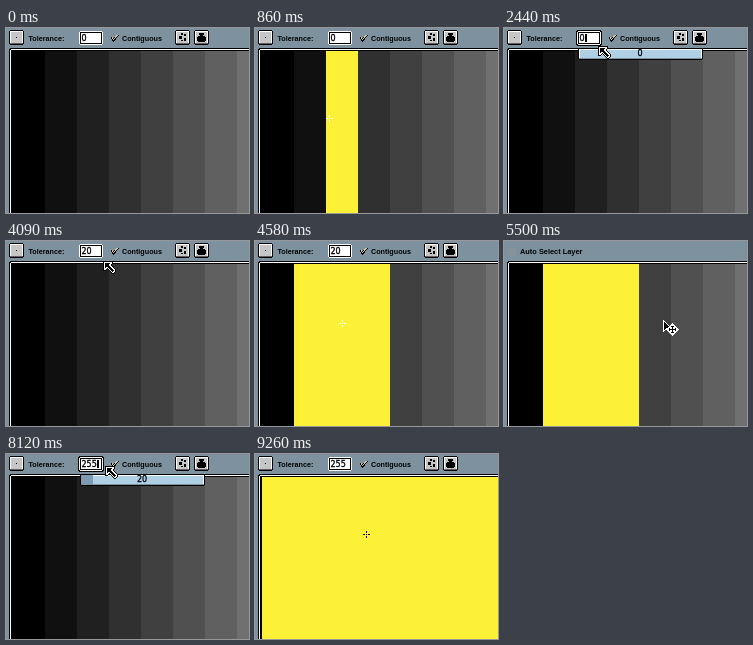
Recreate the animation shown at these times as an HTML page. Size 243x185 px, loop 9.3 s.

```html
<!DOCTYPE html>
<html lang="en">
<head>
<meta charset="utf-8">
<title>Fill tolerance</title>
<style>
  html, body { margin: 0; width: 100%; height: 100%; overflow: hidden; background: #7d929e; }
  svg { display: block; shape-rendering: crispEdges; }
  text { font: bold 7.2px "Liberation Sans", Arial, sans-serif; }
  .num { font: 8px "DejaVu Sans", sans-serif; stroke: #000; stroke-width: .3px; }
</style>
</head>
<body>
<svg width="243" height="185" viewBox="0 0 243 185">
  <defs>
    <g id="button">
      <path d="M1 0h13v1h1v13h-1v1h-13v-1h-1v-13h1z"/>
      <path fill="#fff" d="M1 1h13v12h-13z"/>
      <path fill="#c6c6c6" d="M2 2h11v11h-11z"/>
      <path fill="#655f65" d="M1 13h13v1h-13z"/>
    </g>
  </defs>
  <rect width="243" height="185" fill="#7d929e"/>
  <path d="M4 20H243V185H3V21H4z"/>
  <path fill="#fff" d="M5 21H243V22H5V185H4V22H5z"/>
  <g id="bands"></g>
  <rect id="fill" y="23" height="162" fill="#fcf137"/>

  <g id="tools">
    <use href="#button" x="3" y="2"/>
    <path d="M10 9h1v1h-1z"/>
    <text x="22.5" y="13">Tolerance:</text>
    <path id="focus" d="M73 2h24v1h1v14h-1v1h-24v-1h-1v-14h1z"/>
    <path fill="#fff" d="M74 3h22v1h1v12h-1v1h-22v-1h-1v-12h1z"/>
    <path d="M74 4h22v12h-22z"/>
    <path fill="#fff" d="M75 5h20v10h-20z"/>
    <text id="value" class="num" x="75.5" y="13"></text>
    <path id="caret" d="M0 6h2v8h-2z"/>
    <path fill="none" stroke="#000" stroke-width="2.400" d="M105.5 9.500l2 2.500l4.500-5"/>
    <path fill="none" stroke="#d8c5a5" d="M106 9.500l1.500 2l4-4.500"/>
    <text x="116" y="13">Contiguous</text>
    <use href="#button" x="169" y="2"/>
    <path d="M175 5h2v2h-2zM178 6h2v2h-2zM173 8h3v3h-3zM178 10h2v3h-2zM175 12h2v1h-2z"/>
    <use href="#button" x="188" y="2"/>
    <path d="M193 5h5v2h-1v1h2v1h1v4h-1v1h-7v-1h-1v-4h1v-1h2v-1h-1z"/>
  </g>

  <g id="layerBar">
    <rect x="5.5" y="7.5" width="6" height="6" rx="2" fill="#84939a" stroke="#909394"/>
    <text x="16" y="13" style="font-size:7.4px">Auto Select Layer</text>
  </g>

  <g id="popup">
    <path d="M75 20h123v1h1v10h-1v1h-123v-1h-1v-10h1z"/>
    <path fill="#fff" d="M75 21h123v9h-123z"/>
    <path fill="#afcfe4" d="M76 22h121v8h-121z"/>
    <path fill="#7d929e" d="M75 30h123v1h-123z"/>
    <rect id="level" x="75" y="21" height="9" fill="#7d9cb4"/>
    <text id="levelText" class="num" x="136" y="28" text-anchor="middle"></text>
  </g>

  <g id="cursor">
    <g id="arrow">
      <path d="M0 0H10V2L8 4L13 9V10L10 13H9L4 8L2 10H0z"/>
      <path fill="#fff" d="M1 1H9V2L7 4L12 9V10L10 12H9L4 7L2 9H1z"/>
      <path d="M2 2H7L5.500 4L11 9.500L9.500 11L4 5.500L2 7z"/>
    </g>
    <g id="move">
      <path stroke="#fff" d="M.5 .5V11.500L3.500 8.500L8.500 8.500z"/>
      <path fill="#fff" d="M9.500 3L16 9.500L9.500 16L3 9.500z"/>
      <path d="M9 6h1v3h3v1h-3v3h-1v-3h-3v-1h3zM8 6h3v1h-3zM8 12h3v1h-3zM6 8h1v3h-1zM12 8h1v3h-1z"/>
    </g>
    <path id="cross" d="M0 0h1v1h-1zM-3 0h2v1h-2zM2 0h2v1h-2zM0-3h1v2h-1zM0 2h1v2h-1z"/>
  </g>
</svg>
<script>
const LOOP = 9300, TICK = 60;
const el = id => document.getElementById(id);
const show = (id, on) => el(id).setAttribute("visibility", on ? "inherit" : "hidden");
const within = (t, ...spans) => spans.some(([a, b]) => t >= a && t < b);

// Moves: start, end, destination x, y
const moves = [
  [430, 610, 74, 90],
  [1510, 1630, 98, 52], [1680, 1980, 84, 8], [2260, 2500, 96, 20],
  [4090, 4090, 97, 20], [4150, 4270, 87, 82],
  [5260, 5500, 159, 79], [5620, 6040, 84, 8],
  [6370, 6550, 96, 15], [6610, 6690, 96, 12],
  [7060, 7290, 98, 9], [7650, 7650, 99, 9], [8060, 8120, 99, 12],
  [8300, 8540, 111, 79], [9260, 9260, 111, 80]
];
// Fills: start, end, left, right
const fills = [[860, 1570, 71, 103], [4580, 5620, 39, 135], [8600, LOOP, 7, 243]];
// Field contents from each time on
const entries = [
  [0, "0"], [3170, "02"], [3660, "020"], [4090, "20"],
  [7060, "2"], [7170, ""], [7290, "2"], [7650, "25"], [7810, "255"]
];

for (let i = 0; i < 8; i++) {
  const band = document.createElementNS("http://www.w3.org/2000/svg", "rect");
  const shade = 16 * i;
  const attrs = { x: 7 + 32 * i, y: 23, width: 32, height: 162, fill: `rgb(${shade},${shade},${shade})` };
  for (const key in attrs) band.setAttribute(key, attrs[key]);
  el("bands").append(band);
}

function position(t) {
  let x = 150, y = 208;
  for (const [start, end, toX, toY] of moves) {
    if (t < start) break;
    const steps = Math.round((end - start) / TICK) + 1;
    const p = Math.min(1, (Math.floor((t - start) / TICK) + 1) / steps);
    x += (toX - x) * p;
    y += (toY - y) * p;
  }
  return [Math.round(x), Math.round(y)];
}

function draw(t) {
  const ctrl = within(t, [1510, 1680], [5260, 5680]);
  const open = within(t, [2080, 4090], [6160, 8300]);
  const caretOn = within(t, [2260, 3050], [3170, 4090], [6370, 8300]);
  show("tools", !ctrl);
  show("layerBar", ctrl);
  show("popup", open);
  // Children inherit from the toolbar, so both must be hidden with it
  show("focus", open && !ctrl);
  show("caret", caretOn && !ctrl);

  const text = entries.filter(e => t >= e[0]).pop()[1];
  el("value").textContent = text;
  el("caret").setAttribute("transform", `translate(${76 + 5 * text.length})`);
  const level = t < 4090 ? 0 : 20;
  el("levelText").textContent = level;
  el("level").setAttribute("width", Math.round(level / 255 * 123 + (level ? 2 : 0)));

  const fill = fills.find(f => within(t, f));
  show("fill", fill);
  if (fill) {
    el("fill").setAttribute("x", fill[2]);
    el("fill").setAttribute("width", fill[3] - fill[2]);
  }

  const [x, y] = position(t);
  const kind = ctrl ? "move" : y < 23 ? "arrow" : "cross";
  show("cursor", t >= 430);
  for (const id of ["move", "arrow", "cross"]) show(id, id === kind);
  el("cursor").setAttribute("transform", `translate(${x} ${y})`);
  el("cross").setAttribute("fill", t >= 9260 ? "#000" : "#fff");
}

const begin = performance.now();
function frame() {
  draw((performance.now() - begin) % LOOP);
  requestAnimationFrame(frame);
}
frame();
</script>
</body>
</html>
```
